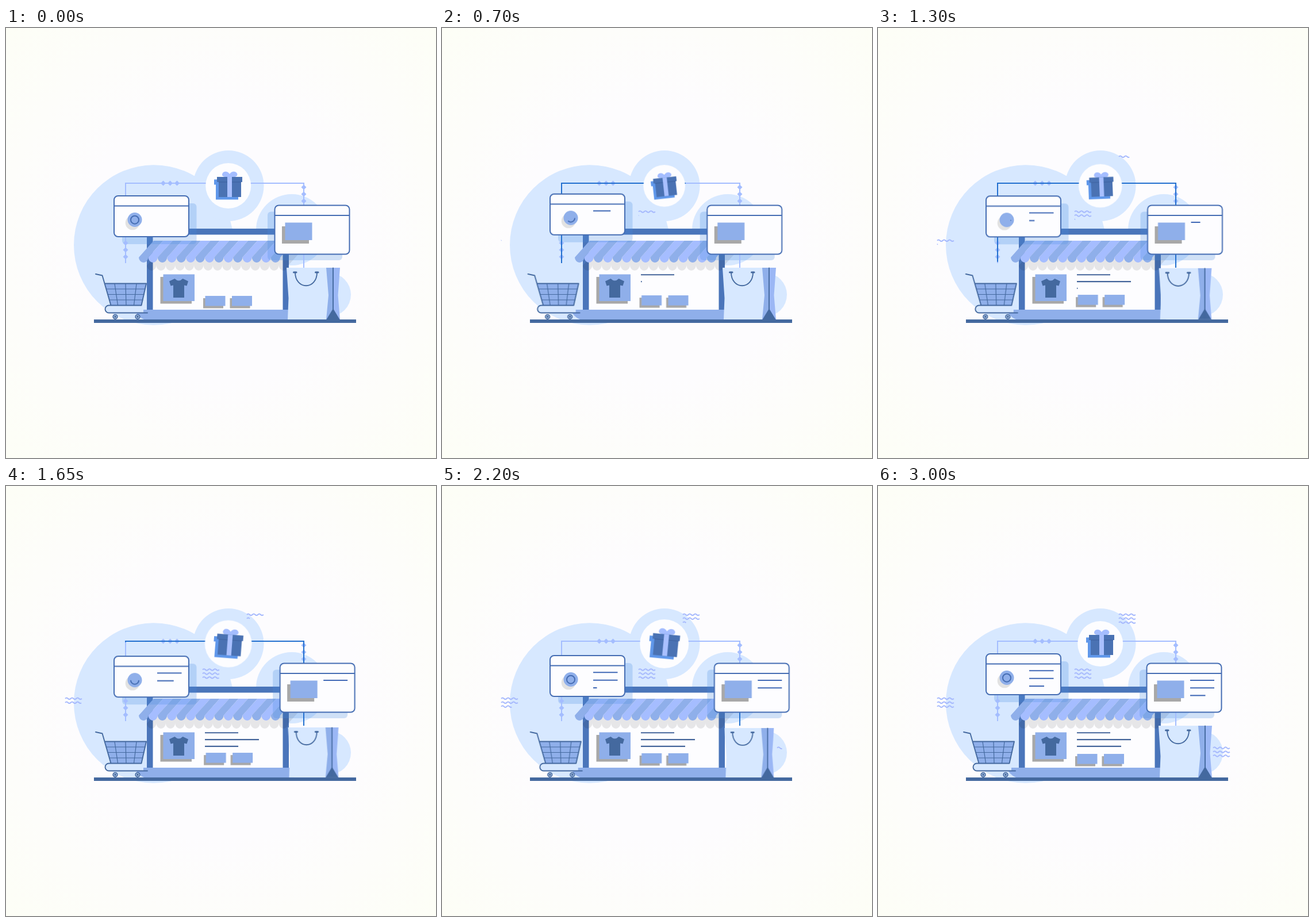
These frames come from a looping animation (748x748 px, 3.05 s). An HTML page:

```html
<!DOCTYPE html>
<html lang="en">
<head>
<meta charset="utf-8">
<title>Online shop</title>
<style>
  html, body { margin: 0; width: 100%; height: 100%; overflow: hidden; }
  body { background: radial-gradient(circle at 50% 50%, #fdfcfe 0 45%, #fdfdfa 72%, #fdfef6 100%); }
  svg { display: block; width: 100%; height: 100%; }

  .pale { fill: #d7e8ff; }
  .paper { fill: #fdfdff; }
  .mid { fill: #8fafea; }
  .deep { fill: #44699f; }
  .frame { fill: #4a75ba; }
  .gray { fill: #a8a8a8; }
  .cast { fill: #4a8be0; opacity: .25; }
  .edge { fill: none; stroke: #456db3; stroke-width: 2; }
  .ink { fill: none; stroke: #44699f; stroke-width: 1.9; stroke-linejoin: round; stroke-linecap: round; }
  .wire { fill: none; stroke: #a4bdff; stroke-width: 2; }
  .signal { fill: none; stroke: #2370cf; stroke-width: 2; }
  .wave { fill: none; stroke: #a6b9fd; stroke-width: 2; }
  .copy { fill: none; stroke: #44659a; stroke-width: 2.1; }
  .label { fill: none; stroke: #4169b6; stroke-width: 2.1; }

  .move {
    animation: 3050ms cubic-bezier(.37, 0, .63, 1) infinite;
    transform-box: view-box;
  }
  #cardA { animation-name: bob; }
  #cardB { animation-name: slide; }
  #cart { animation-name: roll; }
  #goods { animation-name: lift; }
  #badge { animation-name: pulse; transform-origin: 386.7px 274.5px; }
  #gift { animation-name: tilt; transform-origin: 387.5px 275px; }
  #bag { animation-name: squash; transform-origin: 534px 507px; }
  #signal { animation-name: travel; }
  #ring { animation-name: redraw; }

  @keyframes bob {
    0%, 98.4%, 100% { transform: none; }
    28.9% { transform: translateY(-3.6px); }
    56.5% { transform: translateY(4.3px); }
  }
  @keyframes slide {
    0%, 98.4%, 100% { transform: none; }
    28.9% { transform: translateX(-7px); }
    55.7% { transform: translateX(9.3px); }
  }
  @keyframes roll {
    0%, 55.7% { transform: none; }
    28.2%, 98.4%, 100% { transform: translateX(-7px); }
  }
  @keyframes lift {
    0%, 98.4%, 100% { transform: none; }
    49.2% { transform: translate(1.2px, -2px); }
  }
  @keyframes pulse {
    0%, 98.4%, 100% { transform: none; }
    29.5% { transform: scale(.91); }
    67.2% { transform: scale(1.08); }
  }
  @keyframes tilt {
    0%, 98.4%, 100% { transform: none; }
    28.9% { transform: rotate(-7deg); }
    63% { transform: rotate(6.5deg); }
  }
  @keyframes squash {
    0%, 32.8%, 98.4%, 100% { transform: none; }
    67.2% { transform: scale(.92, .953); }
  }
  @keyframes travel {
    0% { stroke-dasharray: 0 0 0 2; }
    41% { stroke-dasharray: 0 0 1 2; }
    82%, 100% { stroke-dasharray: 0 1 0 2; }
  }
  @keyframes redraw {
    0%, 68.9%, 100% { stroke-dasharray: 1 1; }
    39.4% { stroke-dasharray: 0 1; }
  }
</style>
</head>
<body>
<svg viewBox="0 0 748 748">
  <defs>
    <g id="box">
      <path d="M367 259h44v9h-2v26h-39v-26h-3z"/>
    </g>
    <path id="gem" d="M0-4.5L4.5 0 0 4.5-4.5 0z"/>
  </defs>

  <g class="pale">
    <circle cx="257.3" cy="377.5" r="139.3"/>
    <circle cx="387" cy="274.5" r="61.5"/>
    <circle cx="497" cy="351" r="62"/>
    <circle cx="562" cy="464" r="38"/>
  </g>

  <!-- laptop -->
  <rect class="frame" x="245" y="349" width="247" height="141"/>
  <rect class="paper" x="255.5" y="359.5" width="226" height="130.5"/>
  <path id="shade" opacity=".09"/>
  <g id="awning"></g>
  <path class="mid" d="M224 490H512.5Q512 501 500 507H240Q228 502 224 490z"/>
  <rect class="gray" x="268.5" y="433" width="54.5" height="46.5"/>
  <rect class="mid" x="273.5" y="428.5" width="54.5" height="46.5"/>
  <path class="deep" d="M293.500 436L284 440.500 286.500 448.500 291 447.500V469H310V447.500L314.500 448.500 317 440.500 307.500 436Q300.500 443 293.500 436z"/>
  <g id="copy"></g>
  <g id="goods" class="move">
    <path class="gray" d="M343 470h35v17.500h-35zM389.500 470h35v17.500h-35z"/>
    <path class="mid" d="M346.500 466h35v17.500h-35zM393 466h35v17.500h-35z"/>
  </g>

  <g id="bag" class="move">
    <path class="pale" d="M488 417H558L562 465 558 507H490L491.500 470z"/>
    <path class="mid" d="M557 417H569V507H557L561 465z"/>
    <path fill="#9bb7f5" d="M569 417H581L577.500 465 581 507H569z"/>
    <path class="deep" d="M569 488L580.500 507H557.500z"/>
    <path class="ink" d="M569 417.500V506M503 425C503 456 541 456 541 425"/>
    <path class="ink" style="stroke-width:3" d="M500.500 425h4.500M538.500 425h4.500"/>
  </g>
  <rect class="deep" x="153" y="507" width="456" height="6"/>

  <g id="cart" class="move">
    <path class="pale" d="M239 482.500H179a6.500 6.500 0 0 0 0 13H239z"/>
    <path class="mid" d="M172 444.500H244L235.500 482.500H182.500z"/>
    <path class="ink" style="stroke-width:1.2" d="M189 445L194.500 482M208 445L209 482M227 445L222.500 482M175 454H242M177.500 463.500H240M180 473H238"/>
    <path class="ink" d="M156 428L167.500 430.500 182.500 482.500H235.500L244 444.500H172M235.500 482.500H179a6.500 6.500 0 0 0 0 13H246"/>
    <g class="ink">
      <circle class="pale" cx="190" cy="502.300" r="3.700"/>
      <circle class="pale" cx="229" cy="502.300" r="3.700"/>
      <circle cx="190" cy="502.300" r="1"/>
      <circle cx="229" cy="502.300" r="1"/>
    </g>
  </g>

  <g id="waves"></g>

  <rect id="castA" class="cast" x="202" y="305" width="129.500" height="71" rx="6"/>
  <rect id="castB" class="cast" x="455" y="319.500" width="130" height="84.500" rx="6"/>

  <path class="wire" d="M208 409V270H518V417"/>
  <g id="gems" fill="#a4bdff"></g>
  <path id="signal" class="signal move" pathLength="1" d="M208 409V270H518V417"/>

  <g id="badge" class="move">
    <circle class="paper" cx="386.700" cy="274.500" r="39.500"/>
    <g id="gift" class="move">
      <use href="#box" x="-5" y="4.500" fill="#5f97ea"/>
      <path fill="#a4bdff" d="M389 259.500C381 259.500 374 259 376.500 253C379 248 386 249 389 254C392 249 399 248 402 253C404 259 397 259.500 389 259.500z"/>
      <use href="#box" fill="#4a72b3"/>
      <path d="M370 268h39" stroke="#3d619f"/>
      <path fill="#a9c0ff" d="M385 259h8v35h-8z"/>
    </g>
  </g>

  <g id="cardA" class="move">
    <rect class="paper edge" style="fill:#fdfdff" x="188" y="292" width="130" height="71" rx="7"/>
    <path class="edge" d="M188 309.500H318"/>
    <circle cx="220" cy="339" r="12.300" fill="#e2e2e2"/>
    <circle class="mid" cx="224" cy="333.500" r="12.500"/>
    <circle id="ring" class="edge move" pathLength="1" cx="224" cy="333.700" r="7"/>
  </g>

  <g id="cardB" class="move">
    <rect class="edge" style="fill:#fdfdff" x="467.500" y="308.500" width="130" height="85" rx="7"/>
    <path class="edge" d="M467.500 326H597.500"/>
    <rect class="gray" x="480" y="345" width="47" height="30"/>
    <rect class="mid" x="485.500" y="338.500" width="47" height="30.500"/>
  </g>
</svg>
<script>
  const LOOP = 3050;
  const EASE = 'cubic-bezier(.37, 0, .63, 1)';
  const byId = id => document.getElementById(id);

  function add(parent, tag, attrs) {
    const el = document.createElementNS('http://www.w3.org/2000/svg', tag);
    for (const key in attrs) el.setAttribute(key, attrs[key]);
    return byId(parent).appendChild(el);
  }

  // Draws a stroke on between two moments of the loop.
  function reveal(parent, kind, d, [from, to]) {
    const el = add(parent, 'path', { class: kind, d, pathLength: 1, 'stroke-dasharray': '1 2' });
    el.animate([
      { strokeDashoffset: 1, offset: 0 },
      { strokeDashoffset: 1, offset: from / LOOP, easing: EASE },
      { strokeDashoffset: 0, offset: to / LOOP },
      { strokeDashoffset: 0, offset: 1 }
    ], { duration: LOOP, iterations: Infinity });
  }

  // Awning: slanted stripes, each ending in a round scallop.
  const PITCH = 16.4, STRIPES = 15, SLANT = 26;
  const stripe = (x, y) => `M${x + SLANT} ${y}h${PITCH}L${x + PITCH} ${y + 29}a8.2 9 0 0 1 ${-PITCH} 0z`;
  let shade = '';
  for (let i = 0; i < STRIPES; i++) {
    const x = 231 + i * PITCH;
    shade += stripe(x + 14, 384);
    add('awning', 'path', { d: stripe(x, 370), fill: i % 2 ? '#a5bdff' : '#8fafea' });
  }
  byId('shade').setAttribute('d', shade);

  for (const k of [-1, 0, 1]) {
    const s = k * 12;
    for (const [x, y] of [[285.5 + s, 270], [208, 386 + s], [518, 289 + s]])
      add('gems', 'use', { href: '#gem', x, y });
  }

  // Cast shadows follow their cards.
  for (const [id, name] of [['castA', 'bob'], ['castB', 'slide']]) {
    byId(id).classList.add('move');
    byId(id).style.animationName = name;
  }

  const rows = [
    ['copy', 'copy', 346, 429.3, 11.8, [58, 94, 77], [[50, 650], [650, 1250], [1250, 1850]]],
    ['cardA', 'label', 263, 321.3, 13.4, [42.5, 42.5, 26], [[0, 1100], [940, 2100], [2000, 2600]]],
    ['cardB', 'label', 543, 338, 13.2, [42, 42, 26.500], [[1080, 1600], [1650, 2180], [2200, 2680]]]
  ];
  for (const [parent, kind, x, y, gap, widths, times] of rows)
    widths.forEach((w, i) => reveal(parent, kind, `M${x} ${y + i * gap}h${w}`, times[i]));

  const waves = [
    [103, 369.8, [[650, 1250], [1250, 1700], [1850, 2450]]],
    [342, 319.5, [[50, 650], [650, 1250], [1250, 1680]]],
    [419, 223.7, [[950, 1550], [1500, 2050], [2050, 2580]]],
    [583, 455.6, [[2000, 2550], [2250, 2770], [2540, 3000]]]
  ];
  for (const [x, y, times] of waves)
    times.forEach((time, i) =>
      reveal('waves', 'wave', `M${x} ${y + i * 6.9}q2.4-2.600 4.800 0${'t4.800 0'.repeat(5)}`, time));
</script>
</body>
</html>
```
